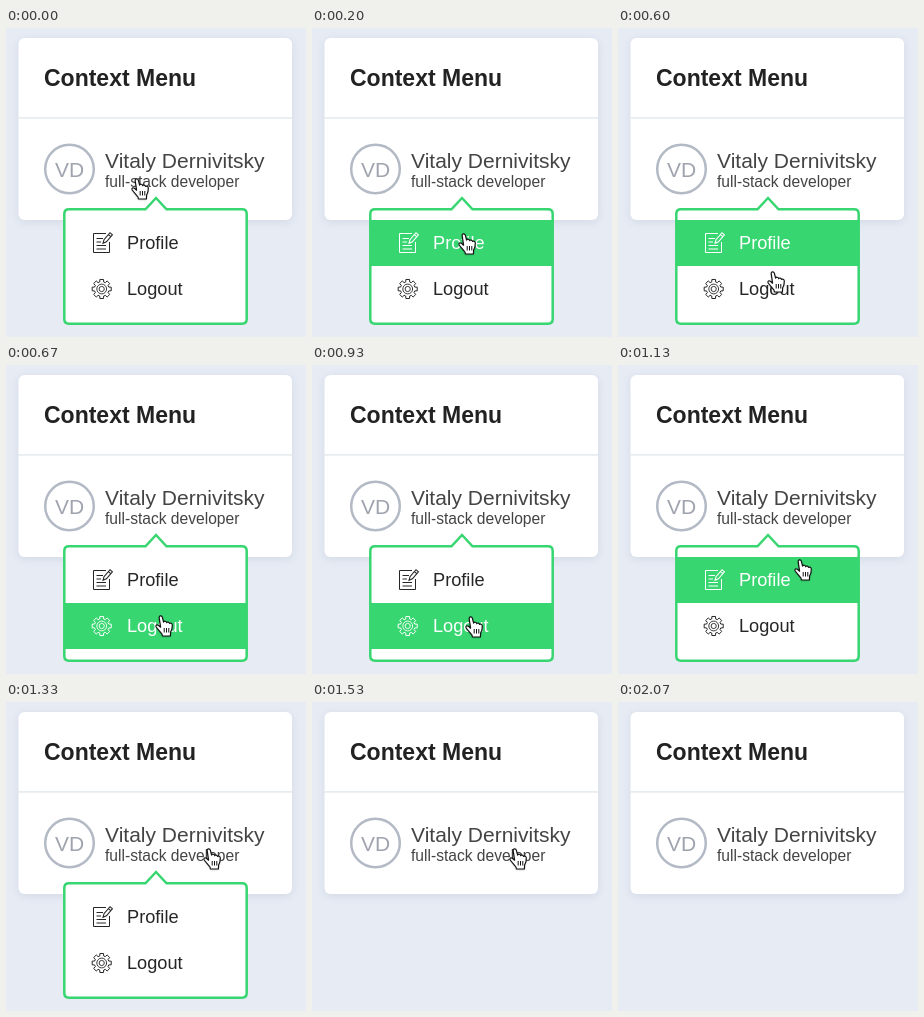
Animation, 300 px wide and 309 px high, one loop 2190 ms. Source, as an HTML page with a canvas:

```html
<!DOCTYPE html>
<html lang="en">
<head>
<meta charset="utf-8">
<title>Context Menu</title>
<style>
  html, body { margin: 0; width: 100%; height: 100%; overflow: hidden; background: #e6ebf4; }
  canvas { display: block; width: 300px; height: 309px; }
</style>
</head>
<body>
<canvas id="stage"></canvas>
<script>
const WIDTH = 300, HEIGHT = 309, LOOP = 2190;
const GREEN = '#37d670', INK = '#262626', FONT = '"Liberation Sans", Arial, sans-serif';
const MENU_HIDES = 1530, CURSOR_LEAVES = 1670;

// Pointer poses: start time, left, top, hovered item (-1 for none).
const POSES = [
  [0, 125, 150, -1], [70, 129, 168, -1], [140, 138, 190, -1],
  [200, 146, 205, 0], [270, 151, 214, 0], [330, 153, 217, 0],
  [530, 152, 227, 0], [600, 149, 243, 0], [670, 149, 250, 1],
  [730, 150, 253, 1], [800, 151, 254, 1], [870, 152, 253, 1],
  [930, 153, 251, 1], [1000, 155, 249, 1], [1070, 166, 227, 1],
  [1130, 176, 194, 0], [1200, 186, 171, 0], [1270, 193, 154, -1],
  [1330, 197, 146, -1], [1600, 240, 108, -1]
];

const ITEMS = [
  { label: 'Profile', top: 192, icon: drawNote },
  { label: 'Logout', top: 238, icon: drawGear }
];

const HAND = new Path2D('M4.2 2.8C3.8 .6 6.8 .2 7.4 2.4L8.6 7.2C9 5.8 11.4 5.9 11.7 7.6' +
  'C12.4 6.6 14.2 6.9 14.5 8.5C15.5 7.6 17.3 8.3 17.3 10C17.4 12.5 16.8 15 15.6 17' +
  'L15.4 21H7.4L7 19C5 16.5 3 14.5 1.2 12C.2 10.2 2 9.2 3.4 10.2L5.6 12.2Z');
const FINGERS = new Path2D('M9.2 13V17.5M11.5 13V17.5M13.8 13V17.5');
const NOTE = new Path2D('M100 205.5H87.5V224.5H103.5V214M90.5 210.5H97M90.5 214H95' +
  'M90.5 217.5H100M90.5 221H100');
const PENCIL = new Path2D('M97 215.3L98 211.7L104 204.7L106.4 206.8L100.4 213.8Z' +
  'M102.4 206.6L104.8 208.7');
const MENU = new Path2D('M63 181.3H139.5L150 170L160.5 181.3H236Q240.7 181.3 240.7 186' +
  'V291Q240.7 295.7 236 295.7H63Q58.3 295.7 58.3 291V186Q58.3 181.3 63 181.3Z');

const canvas = document.getElementById('stage');
const ctx = canvas.getContext('2d');
const scale = window.devicePixelRatio || 1;
canvas.width = WIDTH * scale;
canvas.height = HEIGHT * scale;

function text(str, x, y, size, color, weight = 'normal', align = 'left') {
  ctx.font = `${weight} ${size}px ${FONT}`;
  ctx.textAlign = align;
  ctx.fillStyle = color;
  ctx.fillText(str, x, y);
}

function stroke(path, color, width) {
  ctx.strokeStyle = color;
  ctx.lineWidth = width;
  ctx.stroke(path);
}

function circle(x, y, r) {
  const path = new Path2D();
  path.arc(x, y, r, 0, Math.PI * 2);
  return path;
}

function drawCard() {
  ctx.save();
  ctx.shadowColor = 'rgba(90, 110, 150, 0.13)';
  ctx.shadowBlur = 8 * scale;
  ctx.shadowOffsetY = 2 * scale;
  ctx.fillStyle = '#fff';
  ctx.beginPath();
  ctx.roundRect(12.5, 10, 273.5, 182, 6);
  ctx.fill();
  ctx.restore();

  ctx.fillStyle = '#dce4ea';
  ctx.fillRect(12.5, 89.3, 273.5, 1.2);
  text('Context Menu', 38, 58, 23, '#222', 'bold');
  stroke(circle(63.5, 141, 24.3), '#b3bac5', 2.5);
  text('VD', 63.5, 149, 21, '#9fa3ae', 'normal', 'center');
  text('Vitaly Dernivitsky', 99, 140, 21, '#444');
  text('full-stack developer', 99, 159, 15.6, '#444');
}

function drawNote(color) {
  stroke(NOTE, color, 1);
  stroke(PENCIL, color, 1.1);
}

function drawGear(color) {
  const x = 95.7, y = 261, teeth = 8;
  const outline = new Path2D();
  for (let i = 0; i < teeth; i++) {
    const angle = i * Math.PI * 2 / teeth;
    for (const [offset, r] of [[-0.27, 7.3], [-0.19, 9.7], [0.19, 9.7], [0.27, 7.3]]) {
      outline.lineTo(x + r * Math.cos(angle + offset), y + r * Math.sin(angle + offset));
    }
  }
  outline.closePath();
  stroke(outline, color, 1);
  stroke(circle(x, y, 4.9), color, 0.9);
  stroke(circle(x, y, 2.6), color, 0.9);
}

function drawMenu(hovered) {
  ctx.fillStyle = '#fff';
  ctx.fill(MENU);
  ITEMS.forEach(({ label, top, icon }, i) => {
    const active = i === hovered;
    if (active) {
      ctx.fillStyle = GREEN;
      ctx.fillRect(59, top, 181, 46);
    }
    const color = active ? '#fff' : INK;
    icon(color);
    text(label, 121, top + 29, 18.2, color);
  });
  stroke(MENU, GREEN, 2.5);
}

function drawCursor(x, y) {
  ctx.save();
  ctx.translate(x, y);
  ctx.lineJoin = 'round';
  ctx.shadowColor = 'rgba(0, 0, 0, 0.25)';
  ctx.shadowBlur = 2 * scale;
  ctx.shadowOffsetY = scale;
  ctx.fillStyle = '#fff';
  ctx.fill(HAND);
  ctx.shadowColor = 'transparent';
  stroke(HAND, '#111', 1.2);
  stroke(FINGERS, '#111', 1);
  ctx.restore();
}

function draw(now) {
  const time = now % LOOP;
  const [, x, y, hovered] = POSES.findLast(([start]) => start <= time);
  ctx.setTransform(scale, 0, 0, scale, 0, 0);
  ctx.fillStyle = '#e6ebf4';
  ctx.fillRect(0, 0, WIDTH, HEIGHT);
  drawCard();
  if (time < MENU_HIDES) drawMenu(hovered);
  if (time < CURSOR_LEAVES) drawCursor(x, y);
}

const begin = performance.now();
function tick() {
  draw(performance.now() - begin);
  requestAnimationFrame(tick);
}
tick();
</script>
</body>
</html>
```
